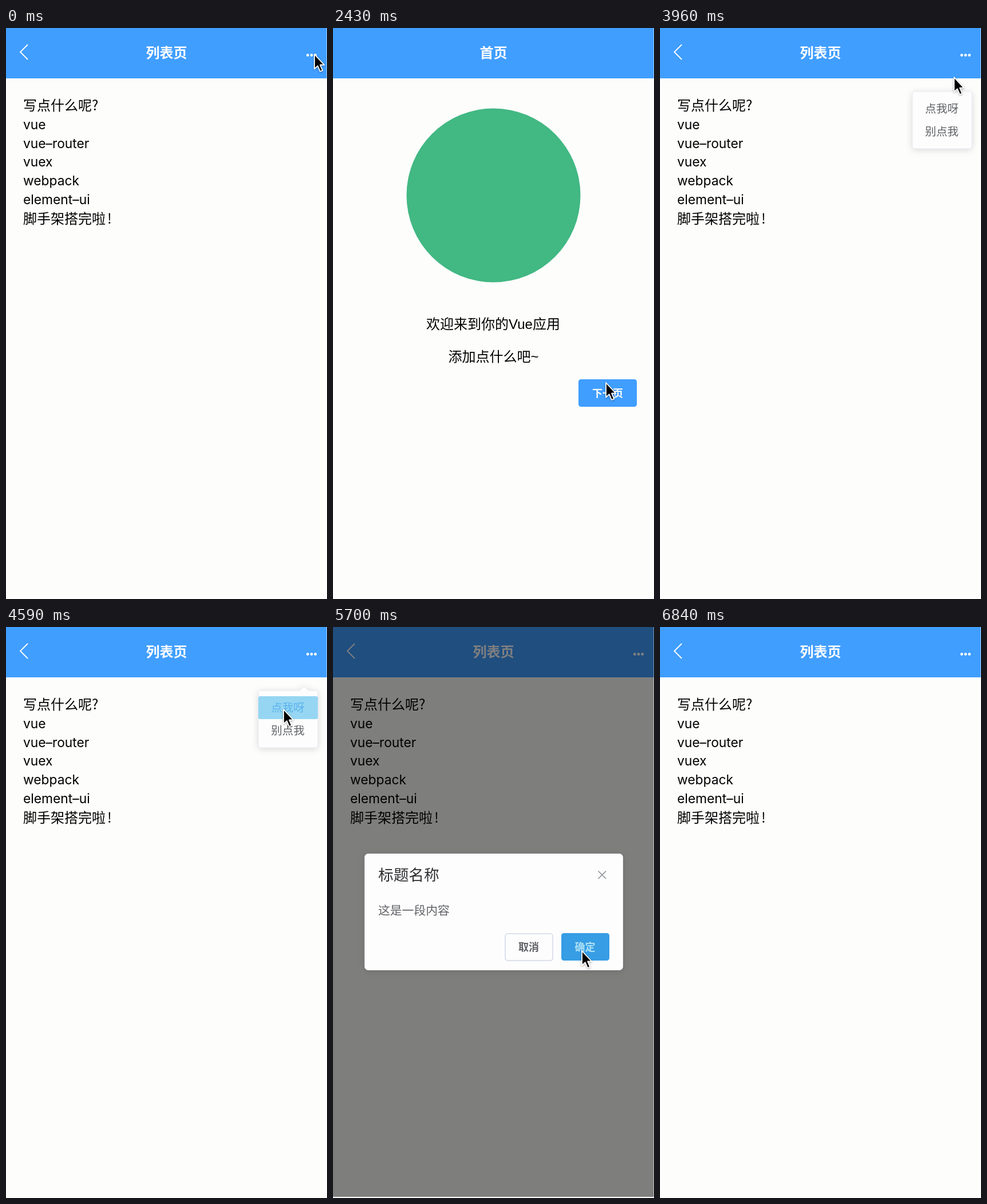
Animation of 561x998 px, one loop 6.87 s. Source, as an HTML page:

```html
<!DOCTYPE html>
<html lang="zh-CN">
<head>
<meta charset="utf-8">
<title>列表页</title>
<style>
  html, body { margin: 0; width: 100%; height: 100%; overflow: hidden; background: #fdfdfc; }
  svg { display: block; font: 24px "Noto Sans CJK SC", "Noto Sans CJK", sans-serif; }
  .mid { text-anchor: middle; }
  .title { font-weight: 700; fill: #fff; }
  .latin { font-family: Inter, sans-serif; font-size: 22.8px; }
  .arial { font-family: "Liberation Sans", "Noto Sans CJK SC", sans-serif; }
  .button { font-size: 18px; font-weight: 700; text-anchor: middle; }
  .item { font-size: 19.5px; font-weight: 500; text-anchor: middle; }
  #menu { filter: drop-shadow(0 2px 6px rgba(0, 0, 0, .14)); }
  #dialog { filter: drop-shadow(0 2px 6px rgba(0, 0, 0, .12)); }
  #cursor { filter: drop-shadow(0 1.5px 1.5px rgba(0, 0, 0, .35)); }
</style>
</head>
<body>
<svg width="561" height="998" viewBox="0 0 561 998">
  <rect width="560.5" height="88" fill="#409eff"/>

  <g id="list">
    <path d="M38 29 25 42 38 55" fill="none" stroke="#fff" stroke-width="1.8"/>
    <text class="mid title" x="280.5" y="52">列表页</text>
    <g fill="#fff">
      <circle cx="527.3" cy="47.5" r="2.4"/>
      <circle cx="534" cy="47.5" r="2.4"/>
      <circle cx="540.7" cy="47.5" r="2.4"/>
    </g>
    <text x="30" y="144">写点什么呢?</text>
    <g class="latin">
      <text x="30" y="176.5">vue</text>
      <text x="30" y="209.5">vue–router</text>
      <text x="30" y="242">vuex</text>
      <text x="30" y="275">webpack</text>
      <text x="30" y="307.5">element–ui</text>
    </g>
    <text x="30" y="342">脚手架搭完啦<tspan dx="3">!</tspan></text>
  </g>

  <g id="home">
    <text class="mid title" x="280.5" y="52">首页</text>
    <circle cx="280.5" cy="292.5" r="152" fill="#42b883"/>
    <text class="mid arial" x="280" y="526">欢迎来到你的Vue应用</text>
    <text class="mid arial" x="280.5" y="583">添加点什么吧~</text>
    <rect x="429" y="614" width="102" height="48" rx="4.5" fill="#409eff"/>
    <text class="button" x="480" y="644.5" fill="#fff">下一页</text>
  </g>

  <g id="menu">
    <path d="M446 111H513L521 103.5 529 111H540a5 5 0 0 1 5 5V206a5 5 0 0 1-5 5H446a5 5 0 0 1-5-5V116a5 5 0 0 1 5-5Z"
      fill="#fdfdfd" stroke="#e6eaf2"/>
    <rect id="tap" x="441" y="121" width="104" height="40" rx="3" fill="#96d6f2"/>
    <text id="pick" class="item" x="492.5" y="148">点我呀</text>
    <text class="item" x="492.5" y="188" fill="#606266">别点我</text>
  </g>

  <rect id="shade" width="560.5" height="996"/>

  <g id="dialog">
    <rect x="55.5" y="396.5" width="451" height="203" rx="6" fill="#fdfdfd" stroke="#ebeef5"/>
    <text x="79" y="442.5" font-size="26.7" fill="#303133">标题名称</text>
    <path d="M463.5 426.5 477 440M477 426.5 463.5 440" stroke="#909399" stroke-width="1.7"/>
    <text x="79" y="503" font-size="20.8" fill="#606266">这是一段内容</text>
    <rect x="301" y="536" width="83" height="47" rx="4.5" fill="#fdfdfd" stroke="#d3d7ea" stroke-width="1.5"/>
    <text class="button" x="342" y="565.5" fill="#606266">取消</text>
    <rect id="confirm" x="399" y="535" width="84" height="48" rx="4.5"/>
    <text id="confirmText" class="button" x="440.5" y="565.5">确定</text>
  </g>

  <path id="cursor" d="M0 0V25.500L5.700 20.200 10 30 14.200 28.200 10 18.500H17.200Z"
    stroke="#fff" stroke-width="1.8" stroke-linejoin="round"/>
</svg>
<script>
const LOOP = 6870, STEP = 30;
const el = id => document.getElementById(id);
const clamp = x => Math.min(1, Math.max(0, x));
const ramp = (t, start, length) => clamp((t - start) / length);
const easeOut = x => 1 - (1 - x) ** 2;
const smooth = x => x * x * (3 - 2 * x);
// Rises after `start`, falls after `end`.
const span = (t, start, end, rise, fall = rise) =>
  easeOut(ramp(t, start, rise)) * (1 - easeOut(ramp(t, end, fall)));

// Pointer stops: time, x, y
const stops = [
  [0, 539, 46], [500, 539, 46], [1400, 29, 34], [1930, 29, 34],
  [2400, 477, 620], [2810, 477, 620], [3300, 531, 52], [3720, 531, 52],
  [4300, 485, 144], [4600, 485, 144], [4820, 261, 332], [4920, 261, 332],
  [5500, 435, 566], [5770, 435, 566], [6300, 590, 250]
];

function pointer(t) {
  const i = stops.findIndex(s => s[0] > t);
  if (i < 0) return stops[stops.length - 1].slice(1);
  const [t0, x0, y0] = stops[i - 1], [t1, x1, y1] = stops[i];
  const k = smooth((t - t0) / (t1 - t0));
  return [x0 + (x1 - x0) * k, y0 + (y1 - y0) * k];
}

function fade(id, opacity) {
  el(id).style.opacity = opacity;
  el(id).style.visibility = opacity > 0 ? "visible" : "hidden";
}

function draw(t) {
  const home = ramp(t, 1960, 170) * (1 - ramp(t, 2830, 170));
  fade("home", home);
  fade("list", 1 - home);

  const menu = span(t, 3660, 4600, 150, 120);
  fade("menu", menu);
  el("menu").setAttribute("transform", `translate(0 ${111 * (1 - menu)}) scale(1 ${menu})`);
  const picked = t >= 4520;
  fade("tap", picked ? menu : 0);
  el("pick").setAttribute("fill", picked ? "#5ab1ee" : "#606266");

  fade("shade", span(t, 4610, 5760, 90, 140) / 2);
  const dialog = span(t, 4610, 5760, 140);
  fade("dialog", dialog);
  el("dialog").setAttribute("transform", `translate(0 ${-30 * (1 - dialog)})`);
  const pressed = t >= 5640;
  el("confirm").setAttribute("fill", pressed ? "#379de4" : "#66b1ff");
  el("confirmText").setAttribute("fill", pressed ? "#ade1f5" : "#fff");

  el("cursor").setAttribute("transform", `translate(${pointer(t)})`);
}

const began = performance.now();
function tick() {
  const t = (performance.now() - began) % LOOP;
  draw(Math.floor(t / STEP) * STEP);
  requestAnimationFrame(tick);
}
tick();
</script>
</body>
</html>
```
